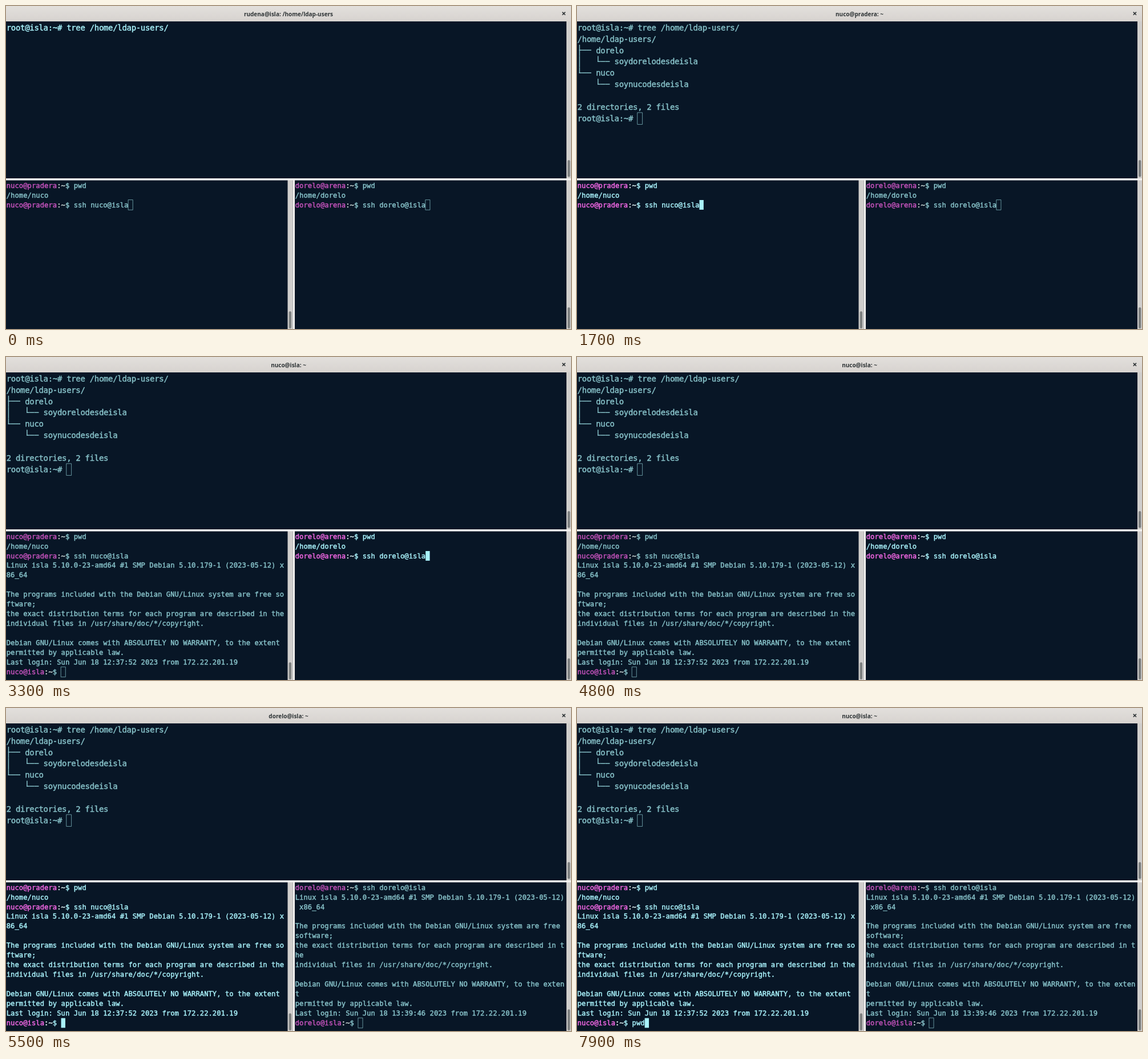
An HTML page with a canvas for the animation above (8000 ms loop, 990 px wide and 566 px high).

```html
<!DOCTYPE html>
<html lang="es">
<head>
<meta charset="utf-8">
<title>Terminal</title>
<style>
  html, body { margin: 0; width: 100%; height: 100%; overflow: hidden; background: #081626; }
  canvas { display: block; }
</style>
</head>
<body>
<canvas id="stage" width="990" height="566"></canvas>
<script>
const ctx = document.getElementById('stage').getContext('2d');
const LOOP = 8000;
const SCALE = 0.737; // terminal cells are whole units, shrunk to the stage

const BRIGHT = { text: '#a9f2fb', user: '#f468e6', path: '#e9fbfb', cursor: '#a9f2fb' };
const DIM = { text: '#87c2c9', user: '#c653bd', path: '#d3dedb', cursor: '#87c2c9' };

const PANES = {
  top:   { x: 0,   y: 28,    cellW: 11, cellH: 27, size: 19,   base: 20, cols: 120, rows: 13 },
  left:  { x: 0,   y: 306.1, cellW: 10, cellH: 23, size: 16.5, base: 17, cols: 66,  rows: 15 },
  right: { x: 506, y: 306.1, cellW: 10, cellH: 23, size: 16.5, base: 17, cols: 64,  rows: 15 },
};

const TREE = [
  '/home/ldap-users/',
  '├── dorelo',
  '│   └── soydorelodesdeisla',
  '└── nuco',
  '    └── soynucodesdeisla',
  '',
  '2 directories, 2 files',
  'root@isla:~# ',
];

const login = (user, time) => [
  'Linux isla 5.10.0-23-amd64 #1 SMP Debian 5.10.179-1 (2023-05-12) x86_64',
  '',
  'The programs included with the Debian GNU/Linux system are free software;',
  'the exact distribution terms for each program are described in the',
  'individual files in /usr/share/doc/*/copyright.',
  '',
  'Debian GNU/Linux comes with ABSOLUTELY NO WARRANTY, to the extent',
  'permitted by applicable law.',
  `Last login: Sun Jun 18 ${time} 2023 from 172.22.201.19`,
  `${user}@isla:~$ `,
];

const session = (user, host) => [
  `${user}@${host}:~$ pwd`,
  `/home/${user}`,
  `${user}@${host}:~$ ssh ${user}@isla`,
];

// Each entry is [start time, value]; the latest one reached applies.
const at = (steps, t) => steps.filter(([start]) => t >= start).pop()[1];

const FOCUS = [[0, 'top'], [1600, 'left'], [3300, 'right'], [5500, 'left']];
const TITLES = [
  [0, 'rudena@isla: /home/ldap-users'],
  [1700, 'nuco@pradera: ~'],
  [3300, 'nuco@isla: ~'],
  [5000, 'dorelo@isla: ~'],
  [5600, 'nuco@isla: ~'],
];
const TYPED = [[0, ''], [6600, 'p'], [6800, 'pw'], [7000, 'pwd']];
const BLINK_OFF = [[0, 200], [1000, 1600], [2900, 3300], [3900, 4200],
                   [4800, 5400], [6100, 6500], [7500, 7900]];

function contents(t) {
  const top = ['root@isla:~# tree /home/ldap-users/'];
  if (t >= 600) top.push(...TREE);
  else if (t >= 500) top.push('');

  const left = session('nuco', 'pradera');
  if (t >= 3300) {
    left.push(...login('nuco', '12:37:52'));
    left[left.length - 1] += at(TYPED, t);
  }

  const right = session('dorelo', 'arena');
  if (t >= 5000) right.push(...login('dorelo', '13:39:46'));
  return { top, left, right };
}

function wrap(lines, cols) {
  return lines.flatMap(line => {
    const parts = [];
    for (let i = 0; i === 0 || i < line.length; i += cols) parts.push(line.slice(i, i + cols));
    return parts;
  });
}

function rect(x, y, w, h, color) {
  ctx.fillStyle = color;
  ctx.fillRect(x, y, w, h);
}

function slider(x, y, h) {
  ctx.fillStyle = '#7e8080';
  ctx.beginPath();
  ctx.roundRect(x, y, 4.4, h, 2.2);
  ctx.fill();
}

// Tree branches fill their whole cell so that neighbours join.
function drawBranch(ch, x, y, w, h) {
  const midX = x + Math.floor(w / 2) - 1, midY = y + Math.floor(h / 2) - 1;
  if (ch === '─') ctx.fillRect(x, midY, w, 2);
  else ctx.fillRect(midX, y, 2, ch === '└' ? midY - y + 2 : h);
  if ('├└'.includes(ch)) ctx.fillRect(midX, midY, x + w - midX, 2);
}

function drawLine(line, y, pane, colors) {
  const prompt = line.match(/^(\w+@\w+):~\$/);
  const userEnd = prompt ? prompt[1].length : 0;
  const pathEnd = prompt ? userEnd + 2 : 0;
  [...line].forEach((ch, col) => {
    const x = 1 + col * pane.cellW;
    ctx.fillStyle = col < userEnd ? colors.user : col < pathEnd ? colors.path : colors.text;
    ctx.strokeStyle = ctx.fillStyle;
    if ('├└│─'.includes(ch)) {
      drawBranch(ch, x, y, pane.cellW, pane.cellH);
    } else if (ch !== ' ') {
      ctx.fillText(ch, x, y + pane.base);
      ctx.strokeText(ch, x, y + pane.base);
    }
  });
}

function drawPane(pane, lines, focused, blinkOff) {
  const colors = focused ? BRIGHT : DIM;
  const rows = wrap(lines, pane.cols).slice(-pane.rows);
  ctx.save();
  ctx.translate(pane.x, pane.y);
  ctx.scale(SCALE, SCALE);
  ctx.textAlign = 'left';
  ctx.font = `${pane.size}px "DejaVu Sans Mono", monospace`;
  ctx.lineWidth = 0.6; // a thin outline gives the medium weight
  ctx.lineJoin = 'round';
  rows.forEach((line, row) => drawLine(line, row * pane.cellH, pane, colors));

  const x = 1 + rows[rows.length - 1].length * pane.cellW;
  const y = (rows.length - 1) * pane.cellH;
  if (!focused) {
    ctx.strokeStyle = colors.cursor;
    ctx.lineWidth = 1;
    ctx.strokeRect(x - 0.5, y - 0.5, pane.cellW + 1, pane.cellH + 1);
  } else if (!blinkOff) {
    rect(x, y, pane.cellW, pane.cellH, colors.cursor);
  }
  ctx.restore();
}

function drawWindow(title) {
  rect(0, 0, 990, 566, '#081626');
  const bar = ctx.createLinearGradient(0, 0, 0, 27);
  bar.addColorStop(0, '#e2dfdc');
  bar.addColorStop(1, '#d7d3cf');
  rect(0, 0, 990, 27, bar);

  ctx.fillStyle = '#2e3436';
  ctx.font = '600 10px "Noto Sans", sans-serif';
  ctx.textAlign = 'center';
  ctx.fillText(title, 495, 17.5);
  ctx.strokeStyle = '#2e3436';
  ctx.lineWidth = 1.6;
  ctx.beginPath();
  ctx.moveTo(974.8, 10.6); ctx.lineTo(980, 15.8);
  ctx.moveTo(980, 10.6); ctx.lineTo(974.8, 15.8);
  ctx.stroke();

  rect(982, 27, 8, 539, '#d0cecc');
  rect(493.5, 305, 9, 261, '#d0cecc');
  rect(0, 302, 990, 3.5, '#f4f2f0');
  rect(502.5, 305, 3.5, 261, '#f4f2f0');
  slider(984, 270, 29.5);
  slider(495.7, 535, 30);
  slider(984, 528, 37);
}

function draw(t) {
  const text = contents(t);
  const focus = at(FOCUS, t);
  const blinkOff = BLINK_OFF.some(([from, to]) => t >= from && t < to);
  drawWindow(at(TITLES, t));
  for (const name in PANES) drawPane(PANES[name], text[name], name === focus, blinkOff);
}

function frame() {
  draw(performance.now() % LOOP);
  requestAnimationFrame(frame);
}
frame();
</script>
</body>
</html>
```
